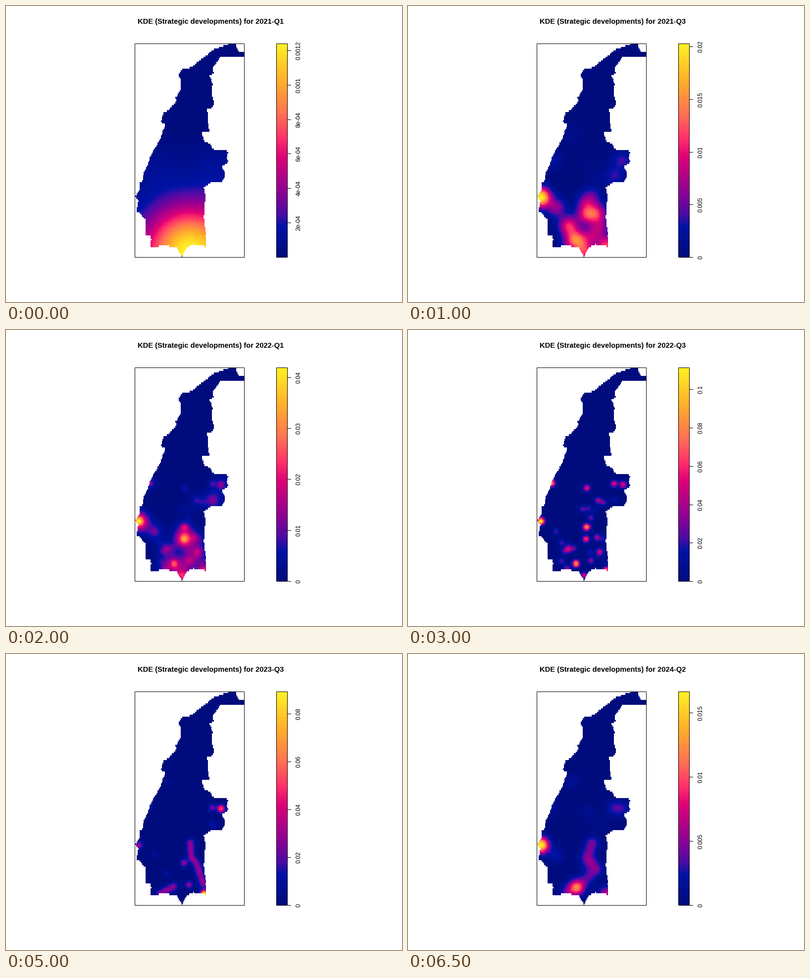
A matplotlib script for the animation above (7000 ms loop, 800 by 600 pixels).

```python
import numpy as np
import matplotlib.pyplot as plt
from matplotlib.animation import FuncAnimation
from matplotlib.collections import LineCollection
from matplotlib.colors import LinearSegmentedColormap
from matplotlib.patches import Rectangle
from matplotlib.path import Path

plt.rcParams["font.family"] = "Liberation Sans"

DPI = 100
PX = 72 / DPI
N = 128
X0, X1, Y0, Y1 = 260.5, 481.5, 76.5, 509.5
BAR0, BAR1 = 546.5, 568.5

# key points of the region's border, in stage pixels
WEST = [
    (463, 77), (452, 77), (416, 90), (391, 111), (369, 127), (356, 128),
    (347, 141), (352, 150), (351, 173), (342, 187), (345, 191), (328, 212),
    (318, 216), (312, 236), (321, 241), (310, 272), (295, 297), (287, 318),
    (277, 342), (274, 358), (269, 359), (268, 376), (261, 386), (267, 396),
    (264, 416), (281, 432), (282, 464), (292, 466), (292, 488), (298, 491),
    (313, 486), (343, 488), (355, 507), (365, 489), (379, 484), (404, 488),
]
EAST = [
    (402, 452), (399, 430), (402, 390), (399, 369), (415, 357), (434, 359),
    (443, 343), (435, 326), (449, 317), (446, 308), (449, 295), (418, 291),
    (412, 279), (400, 276), (394, 256), (411, 254), (405, 209), (413, 208),
    (420, 202), (416, 178), (417, 159), (410, 142), (419, 137), (417, 127),
    (432, 104), (461, 103), (482, 104), (482, 94), (470, 93),
]

# settlements that recur from quarter to quarter
PLACES = dict(
    west=(268, 388), coast=(290, 311), bay=(331, 260), inland=(361, 321),
    east=(434, 314), ridge=(416, 312), ford=(417, 346), gap=(384, 346),
    hill=(372, 385), upper=(359, 400), market=(359, 424), bridge=(381, 421),
    mill=(387, 450), grove=(324, 446), city=(339, 474), plain=(321, 484),
    lake=(369, 468), border=(400, 487), tip=(355, 498), farm=(299, 409),
)

STOPS = [
    (0, "#000c7d"), (.14, "#0013a8"), (.20, "#4b0ca6"), (.30, "#8c0096"),
    (.47, "#df0078"), (.55, "#ff2c6b"), (.67, "#ff7055"), (.82, "#ffad2a"),
    (1, "#fff123"),
]
CMAP = LinearSegmentedColormap.from_list("bmy", STOPS, N=256)
CMAP.set_bad((1, 1, 1, 0))

rng = np.random.default_rng(4)


def ragged(points, step=7, rough=.9):
    """Closed line through the points, roughened between them."""
    out = []
    for a, b in zip(points, points[1:] + points[:1]):
        a, b = np.array(a, float), np.array(b, float)
        out.append(a)
        count = int(np.hypot(*(b - a)) // step)
        for k in range(1, count):
            out.append(a + (b - a) * k / count + rng.uniform(-rough, rough, 2))
    return np.array(out)


cell_x = X0 + (np.arange(N) + .5) * (X1 - X0) / N
cell_y = Y0 + (np.arange(N) + .5) * (Y1 - Y0) / N
GX, GY = np.meshgrid(cell_x, cell_y)
INSIDE = Path(ragged(WEST + EAST)).contains_points(
    np.c_[GX.ravel(), GY.ravel()]).reshape(N, N)


def kernel(a, sigma, b=None):
    """Gaussian around point a, or around the stretch from a to b."""
    dx, dy = np.subtract(b or a, a)
    t = ((GX - a[0]) * dx + (GY - a[1]) * dy) / (dx * dx + dy * dy or 1)
    t = np.clip(t, 0, 1)
    d2 = (GX - a[0] - t * dx) ** 2 + (GY - a[1] - t * dy) ** 2
    return np.exp(-d2 / (2 * sigma ** 2))


def road(sigma, *points):
    return np.max([kernel(a, sigma, b)
                   for a, b in zip(points, points[1:])], axis=0)


def scatter(sigma, count, top):
    """Minor events spread over the southern districts."""
    xs, ys = rng.uniform(308, 398, count), rng.uniform(345, 484, count)
    heights = top * rng.uniform(.2, 1, count)
    return sum(h * kernel(p, sigma) for *p, h in zip(xs, ys, heights))


def towns(sigma, **heights):
    return sum(h * kernel(PLACES[k], sigma) for k, h in heights.items())


# quarter index: (peak value, density)
KNOWN = {
    0: (.00124, kernel((372, 503), 68) + .06 * kernel((300, 330), 35)
        + .07 * kernel((420, 330), 35)),
    1: (.01602, towns(
        14, west=.9, farm=.3, grove=.7, city=.75, bridge=.65, upper=.3,
        hill=.3, lake=.2, mill=.2, tip=.4, border=.6, east=.1, ridge=.08,
        bay=.1, coast=.12, inland=.04)),
    3: (.0257, towns(
        13, west=.85, farm=.25, market=.72, upper=.18, bridge=.18, mill=.32,
        city=.36, grove=.22, plain=.2, lake=.32, border=.4, tip=.5, east=.2,
        ford=.3, gap=.09, coast=.1)),
    6: (.1114, scatter(5, 16, .25) + towns(
        5, west=1, coast=.7, inland=.48, east=.46, ridge=.45, ford=.13,
        gap=.33, upper=.6, market=.55, bridge=.33, mill=.41, city=.8,
        grove=.32, plain=.3, lake=.3, border=.6, tip=.4, farm=.2)),
    8: (.1425, scatter(4.5, 16, .25) + .24 * road(4.5, (384, 337), (384, 368))
        + .4 * road(4.5, (383, 369), (371, 386))
        + .55 * road(4.5, (353, 427), (366, 425)) + towns(
        4.5, west=.5, east=.32, ridge=.58, ford=.25, market=.15, bridge=.9,
        mill=.48, city=.92, plain=.4, lake=.25, border=.4, tip=.35)),
    10: (.0892, .31 * road(6, (372, 384), (374, 412), (384, 424), (398, 466))
         + .3 * road(6, (311, 486), (338, 472)) + towns(
        5.5, east=.6, ridge=.25, west=.32, ford=.13, market=.32, border=1,
        grove=.1, lake=.32, coast=.1, farm=.09, bay=.04)),
    13: (.01667, .26 * road(10, (371, 385), (363, 411), (379, 436))
         + .2 * road(10, (345, 472), (364, 453)) + towns(
        11, west=.95, city=.5, plain=.2, market=.08, east=.13, ridge=.16,
        border=.35, farm=.13, coast=.07, bay=.07, inland=.06, gap=.05)),
}
COUNT = 14


def quarter(i):
    """Peak and unit density; quarters in between mix their neighbours."""
    lo = max(k for k in KNOWN if k <= i)
    hi = min(k for k in KNOWN if k >= i)
    t = (i - lo) / max(hi - lo, 1)
    (p, a), (q, b) = KNOWN[lo], KNOWN[hi]
    z = (1 - t) * a / a[INSIDE].max() + t * b / b[INSIDE].max()
    return p ** (1 - t) * q ** t, z / z[INSIDE].max()


def nice_step(top):
    cell = top / 5
    base = 10 ** np.floor(np.log10(cell))
    step = base
    for k, bias in ((2, .8), (5, 1.7), (10, .8)):
        if k * base - cell < bias * (cell - step):
            step = k * base
    return step


def label(v):
    return f"{v:.0e}" if 0 < v < 9.5e-4 else f"{v:.4g}"


QUARTERS = [quarter(i) for i in range(COUNT)]

fig = plt.figure(figsize=(8, 6), dpi=DPI, facecolor="white")
ax = fig.add_axes([0, 0, 1, 1])
ax.axis("off")

chart = ax.imshow(np.zeros((N, N)), cmap=CMAP, vmin=0, vmax=1, aspect="auto",
                  extent=(X0, X1, Y1, Y0), interpolation="nearest")
ax.imshow(np.linspace(1, 0, 256)[:, None], cmap=CMAP, aspect="auto",
          extent=(BAR0, BAR1, Y1, Y0), interpolation="nearest")
ax.set_xlim(0, 800)
ax.set_ylim(600, 0)

# edges already sit on pixel centres, so snapping would shift them
for left, right in ((X0, X1), (BAR0, BAR1)):
    ax.add_patch(Rectangle((left, Y0), right - left, Y1 - Y0, fill=False,
                           ec="black", lw=PX, snap=False, zorder=4))
ax.plot([355.5, 355.5], [506, 509], color="black", lw=PX, snap=False)

title = ax.text(413.5, 36, "", ha="center", va="baseline",
                fontsize=14.6 * PX, fontweight="bold")
ticks = LineCollection([], colors="black", linewidths=PX, zorder=4)
ticks.set_snap(False)
ax.add_collection(ticks, autolim=False)
labels = [ax.text(594.5, 0, "", rotation=90, rotation_mode="anchor",
                  ha="center", va="baseline", fontsize=12.3 * PX)
          for _ in range(12)]


def draw(i):
    top, z = QUARTERS[i]
    chart.set_data(np.ma.array(z, mask=~INSIDE))
    title.set_text("KDE (Strategic developments) for "
                   f"{2021 + i // 4}-Q{i % 4 + 1}")
    step = nice_step(top)
    first = 1 if i == 0 else 0  # the opening range starts above zero
    values = [k * step for k in range(first, int(top / step) + 1)]
    ys = [np.floor(Y1 - v / top * (Y1 - Y0)) + .5 for v in values]
    ticks.set_segments([[(BAR1, y), (576, y)] for y in ys])
    for text in labels:
        text.set_text("")
    for text, v, y in zip(labels, values, ys):
        text.set_text(label(v))
        text.set_y(y)
    return [chart, title, ticks, *labels]


anim = FuncAnimation(fig, draw, frames=COUNT, interval=500,
                     repeat=True, repeat_delay=0, blit=False)
plt.show()
```
